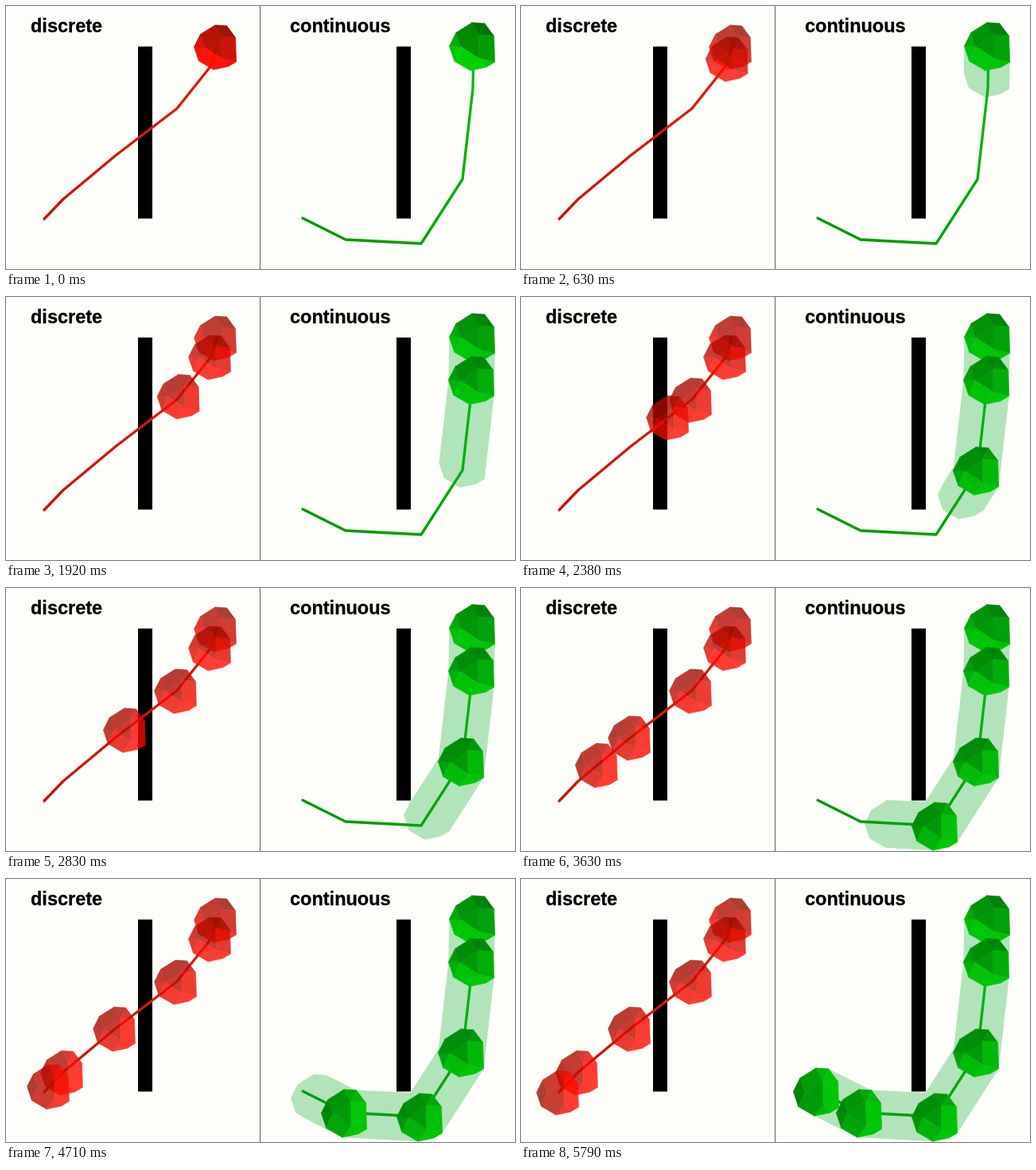
Recreate the animation shown at these times as an HTML page with a canvas. Size 640 by 331 pixels, loop 5870 ms.

```html
<!DOCTYPE html>
<html lang="en">
<head>
<meta charset="utf-8">
<title>Discrete and continuous collision checking</title>
<style>
  html, body { margin: 0; width: 100%; height: 100%; overflow: hidden; background: #fdfdfa; }
  canvas { position: absolute; left: 0; top: 0; }
  .label {
    position: absolute; top: 11px; color: #000;
    font: bold 23.5px/28px "Liberation Sans", Arial, sans-serif;
    -webkit-text-stroke: 0.3px #000;
  }
</style>
</head>
<body>
<canvas id="stage" width="640" height="331"></canvas>
<div class="label" style="left:31px">discrete</div>
<div class="label" style="left:357px">continuous</div>
<script>
const W = 640, H = 331, LOOP = 5870, FPS = 24, LAST = 5;
const ctx = document.getElementById('stage').getContext('2d');
const layer = document.createElement('canvas');
layer.width = W;
layer.height = H;
const lctx = layer.getContext('2d');

// Rim of the stone: three blunt corners (left, upper right, lower right) of three points each
const RIM = [[-21, 18], [-27, 0], [-19, -16], [0, -28], [15, -27], [26, -12], [27, 19], [17, 25], [-2, 29]];

const red = {
  path: [[265, 51], [258, 75], [215, 129], [138, 188], [72, 243], [48, 268]],
  dark: [155, 12, 0], bright: [255, 12, 0], scale: 0.98
};
const green = {
  path: [[588, 50], [587, 104], [574, 218], [522, 299], [427, 294], [373, 267]],
  dark: [0, 115, 0], bright: [0, 210, 0], scale: 1.06
};

const lerp = (a, b, k) => a + (b - a) * k;
const mix = (a, b, k) => a.map((v, i) => lerp(v, b[i], k));
const rgb = c => `rgb(${c.map(Math.round).join(',')})`;
const clamp = v => Math.max(0, Math.min(1, v));
const mean = pts => [0, 1].map(i => pts.reduce((sum, p) => sum + p[i], 0) / pts.length);

// Each corner has a ridge point inside it; faces join the ridges to the rim
const ridges = [0, 3, 6].map(i => mean(RIM.slice(i, i + 3)).map(v => v * 0.6));
const faces = [ridges];
ridges.forEach((ridge, j) => {
  const [p, q, r] = RIM.slice(j * 3, j * 3 + 3);
  const next = RIM[(j * 3 + 3) % RIM.length];
  faces.push([p, q, ridge], [q, r, ridge], [r, next, ridges[(j + 1) % 3], ridge]);
});

function trace(c, pts) {
  pts.forEach(([x, y], i) => i ? c.lineTo(x, y) : c.moveTo(x, y));
}

// Places stone points at position u along the path
function place(set, u, pts) {
  const i = Math.min(Math.floor(u), LAST - 1);
  const [x, y] = mix(set.path[i], set.path[i + 1], u - i);
  return pts.map(([px, py]) => [x - 2 + px * set.scale, y + 0.5 + py * set.scale]);
}

// The lit side turns from below to the right as the stone travels
function drawStone(c, set, u) {
  const angle = lerp(1.9, 0, u / LAST);
  c.lineWidth = 0.6;
  c.lineJoin = 'round';
  for (const face of faces) {
    const [x, y] = mean(face);
    const lit = (x * Math.cos(angle) + y * Math.sin(angle)) / 26;
    const tone = clamp(0.55 + lit * 0.7 - (face === ridges ? 0.25 : 0));
    c.fillStyle = c.strokeStyle = rgb(mix(set.dark, set.bright, tone));
    c.beginPath();
    trace(c, place(set, u, face));
    c.closePath();
    c.fill();
    c.stroke();
  }
}

function drawGlassStone(set, u) {
  lctx.clearRect(0, 0, W, H);
  drawStone(lctx, set, u);
  ctx.globalAlpha = 0.8;
  ctx.drawImage(layer, 0, 0);
  ctx.globalAlpha = 1;
}

function hull(points) {
  const pts = [...points].sort((a, b) => a[0] - b[0] || a[1] - b[1]);
  const half = list => {
    const out = [];
    for (const p of list) {
      while (out.length > 1) {
        const [a, b] = out.slice(-2);
        if ((b[0] - a[0]) * (p[1] - a[1]) - (b[1] - a[1]) * (p[0] - a[0]) > 0) break;
        out.pop();
      }
      out.push(p);
    }
    return out.slice(0, -1);
  };
  return [...half(pts), ...half(pts.reverse())];
}

// Volume covered by the stone from the start up to u
function drawSweep(set, u) {
  ctx.fillStyle = 'rgba(0,170,30,0.3)';
  ctx.beginPath();
  for (let i = 0; i < u; i++) {
    const ends = [i, Math.min(i + 1, u)].flatMap(v => place(set, v, RIM));
    trace(ctx, hull(ends));
    ctx.closePath();
  }
  ctx.fill();
}

function drawPath(pts, from, to) {
  const paint = ctx.createLinearGradient(...pts[0], ...pts[LAST]);
  paint.addColorStop(0, from);
  paint.addColorStop(1, to);
  ctx.strokeStyle = paint;
  ctx.lineWidth = 3.3;
  ctx.lineCap = ctx.lineJoin = 'round';
  ctx.beginPath();
  trace(ctx, pts);
  ctx.stroke();
}

function draw(ms) {
  // One path segment per second
  const u = Math.min(Math.floor(ms * FPS / 1000 + 0.1) / FPS, LAST);
  ctx.fillStyle = '#fdfdfa';
  ctx.fillRect(0, 0, W, H);
  ctx.fillStyle = '#000';
  for (const x of [166, 491]) ctx.fillRect(x, 51, 18, 216.5);
  ctx.fillStyle = '#606060';
  ctx.fillRect(319, 0, 1, H);

  drawPath(red.path, '#e01c0c', '#c8140a');
  for (let i = 0; i <= u && i < LAST; i++) drawGlassStone(red, i);
  drawGlassStone(red, u);

  drawPath(green.path, '#00be0a', '#009600');
  for (let i = 0; i <= u; i++) drawStone(ctx, green, i);
  drawSweep(green, u);
}

let start;
function tick(now) {
  start ??= now;
  draw((now - start) % LOOP);
  requestAnimationFrame(tick);
}
draw(0);
requestAnimationFrame(tick);
</script>
</body>
</html>
```
